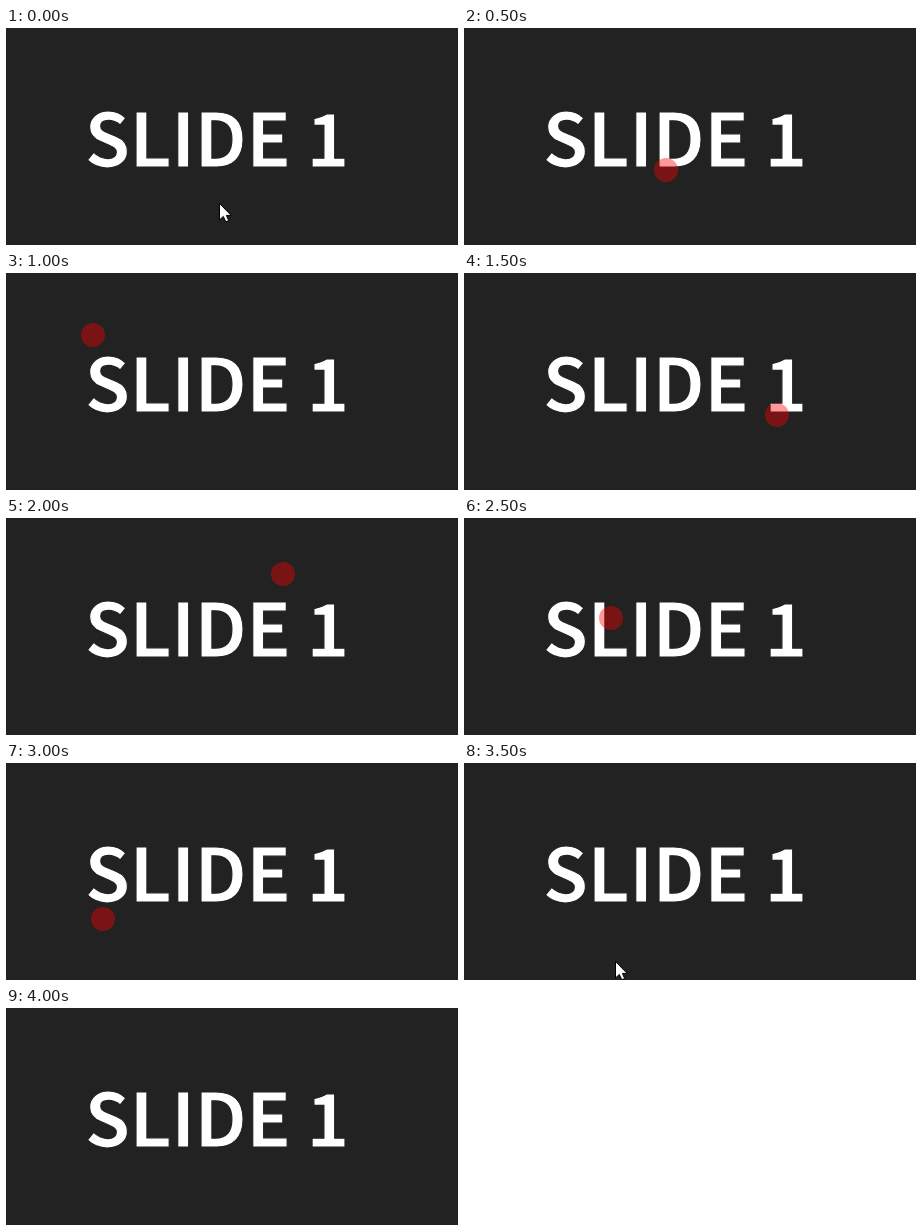
An HTML page for the animation above (4.25 s loop, 452 by 217 pixels).

```html
<!DOCTYPE html>
<html lang="en">
<head>
<meta charset="utf-8">
<title>Slide pointer</title>
<style>
  html, body {
    margin: 0;
    width: 100%;
    height: 100%;
    overflow: hidden;
    background: #222;
  }
  svg {
    display: block;
    width: 452px;
    height: 217px;
  }
  /* The background-coloured stroke trims bold down to semibold. */
  .title {
    font: 600 74px "Noto Sans CJK JP", "Noto Sans CJK SC", "Noto Sans CJK", "Open Sans", sans-serif;
    letter-spacing: -1.1px;
    fill: #fff;
    stroke: #222;
    stroke-width: 1.2px;
  }
  .dot {
    fill: rgba(255, 0, 0, .4);
    animation: sweep 4250ms step-end infinite;
  }
  .cursor {
    fill: #fff;
    stroke: #000;
    animation: wander 4250ms step-end infinite;
  }

  /* Each step lasts 250 ms, 1/17 of the loop; hidden parts park off stage. */
  @keyframes sweep {
    0%      { transform: translate(-60px, -60px); }
    11.764% { transform: translate(202px, 142px); }
    17.647% { transform: translate(118px, 97px); }
    23.529% { transform: translate(87px, 62px); }
    29.411% { transform: translate(166px, 112px); }
    35.294% { transform: translate(313px, 142px); }
    41.176% { transform: translate(355px, 79px); }
    47.058% { transform: translate(277px, 56px); }
    52.941% { transform: translate(201px, 65px); }
    58.823% { transform: translate(147px, 100px); }
    64.705% { transform: translate(110px, 130px); }
    70.588% { transform: translate(97px, 156px); }
    76.47%, 100% { transform: translate(-60px, -60px); }
  }
  @keyframes wander {
    0%      { transform: translate(213px, 175px); }
    5.882%  { transform: translate(228px, 183px); }
    11.764% { transform: translate(-60px, -60px); }
    82.352% { transform: translate(151px, 198px); }
    88.235% { transform: translate(185px, 216px); }
    94.117%, 100% { transform: translate(-60px, -60px); }
  }
</style>
</head>
<body>
<svg viewBox="0 0 452 217">
  <text class="title" x="78.2" y="139.2">SLIDE 1</text>
  <circle class="dot" r="12"/>
  <path class="cursor" d="M.5 .5V17L4.3 13.4 6.8 18.8 9.7 17.6 7.4 12.4H12.2Z"/>
</svg>
</body>
</html>
```
